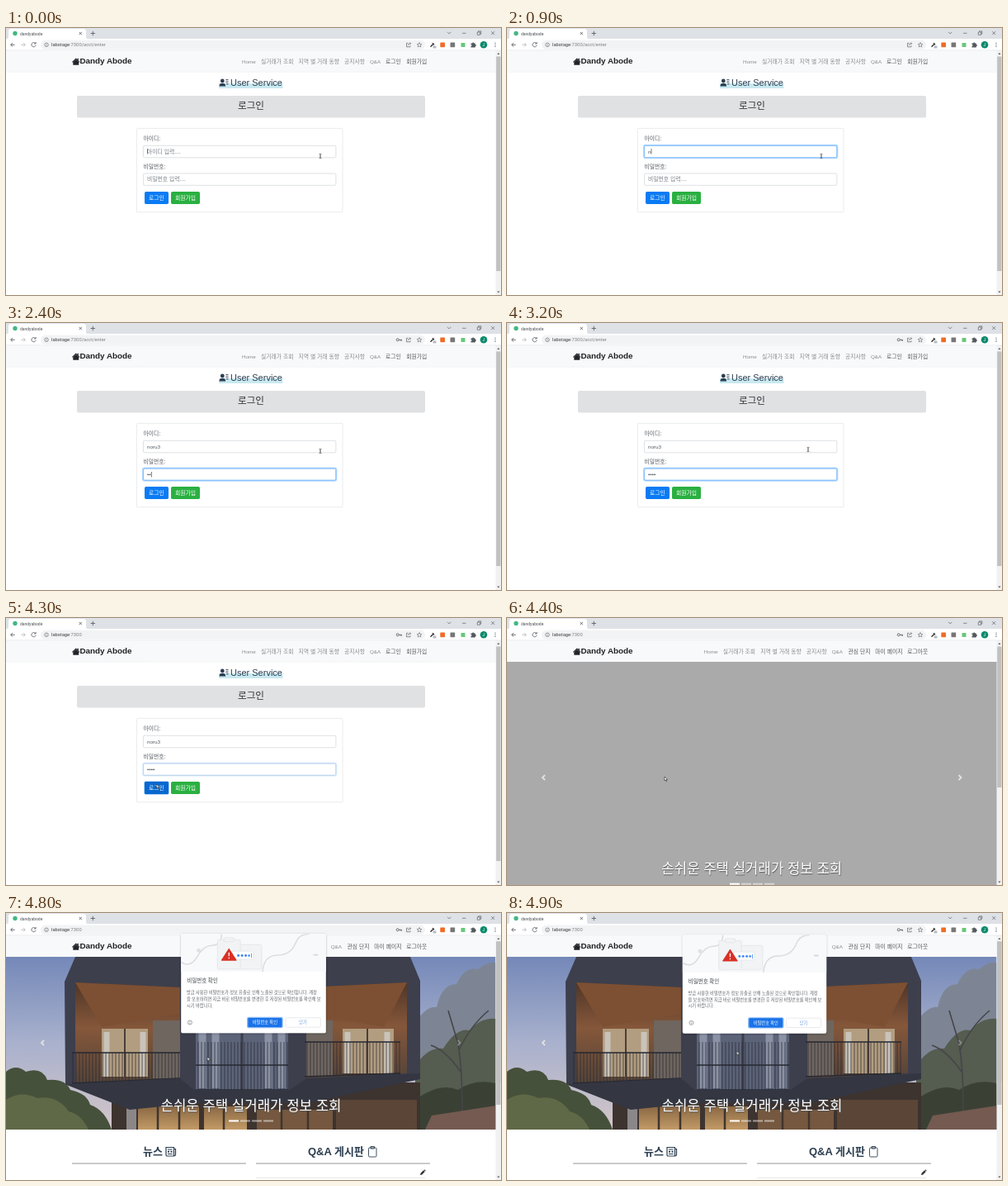
An HTML page for the animation above (5 s loop, 600 by 323 pixels).

```html
<!DOCTYPE html>
<html lang="ko">
<head>
<meta charset="utf-8">
<title>dandyabode</title>
<style>
html, body { margin: 0; width: 100%; height: 100%; overflow: hidden; background: #fff; }
svg { display: block; width: 100vw; height: 100vh; }
text { font-family: "Liberation Sans", "Noto Sans CJK KR", "Noto Sans CJK", sans-serif; font-size: 6.8px; fill: #555b62; }
.ui { font-family: Roboto, "Noto Sans CJK KR", "Noto Sans CJK", sans-serif; }
.url { font-size: 5.8px; fill: #7c8085; }
.url tspan { fill: #3a3d41; }
.lat { font-size: 6.25px; }
.link { fill: #8b8c8e; }
.on { fill: #55585b; font-weight: 500; }
.hint { fill: #777f87; }
.mid { text-anchor: middle; }
.white { fill: #fff; }
.head { font-size: 13px; font-weight: 700; fill: #2c3e50; }
.line { fill: none; stroke: #5f6368; stroke-width: .9; }
.field { fill: #fff; stroke: #ced4da; stroke-width: .7; }
.ring { fill: none; stroke: #b9dcff; stroke-width: 2; }
.edge { fill: none; stroke: #73b5fb; stroke-width: .8; }
.caption { font-size: 16.75px; font-weight: 350; fill: #fff; text-anchor: middle; text-shadow: .5px .5px 1px #555; }
.small { font-size: 5.3px; fill: #5f6368; }

.a { animation: 5s step-end -20ms infinite; }
.login { animation-name: login; }
.home { animation-name: home; }
.wait { animation-name: wait; }
.photo { animation-name: photo; }
.key { animation-name: key; }
.long { animation-name: long; }
.short, .pressed { animation-name: short; }
.hover { animation-name: hover; }
.focus1 { animation-name: focus1; }
.focus2 { animation-name: focus2; }
.hint1 { animation-name: hint1; }
.hint2 { animation-name: hint2; }
.name { animation-name: name; }
.dots { animation-name: dots; }
.caret { animation-name: caret; }
.mouse { animation-name: mouse; }
.beam { animation-name: beam; }
.arrow { animation-name: arrow; }
.dialog { animation-name: dialog; transform-origin: 300px 190px; }

@keyframes login { 0% { opacity: 1 } 88%, to { opacity: 0 } }
@keyframes home { 0% { opacity: 0 } 88%, to { opacity: 1 } }
@keyframes wait { 0% { opacity: 1 } 96%, to { opacity: 0 } }
@keyframes photo { 0% { opacity: 0 } 96%, to { opacity: 1 } }
@keyframes key { 0% { opacity: 0 } 42%, to { opacity: 1 } }
@keyframes long { 0% { opacity: 1 } 86%, to { opacity: 0 } }
@keyframes short { 0% { opacity: 0 } 86%, to { opacity: 1 } }
@keyframes hover { 0% { opacity: 0 } 82%, to { opacity: 1 } }
@keyframes focus1 { 0% { opacity: 0 } 2% { opacity: 1 } 40%, to { opacity: 0 } }
@keyframes focus2 { 0% { opacity: 0 } 40% { opacity: 1 } 86%, to { opacity: .4 } }
@keyframes hint1 { 0% { opacity: 1 } 16%, to { opacity: 0 } }
@keyframes hint2 { 0% { opacity: 1 } 42%, to { opacity: 0 } }
@keyframes name {
  0% { clip-path: inset(0 100% 0 0) } 16% { clip-path: inset(0 78.2% 0 0) }
  20% { clip-path: inset(0 56.5% 0 0) } 24% { clip-path: inset(0 43.5% 0 0) }
  28% { clip-path: inset(0 21.7% 0 0) } 32%, to { clip-path: inset(0) }
}
@keyframes dots {
  0% { clip-path: inset(0 100% 0 0) } 42% { clip-path: inset(0 75% 0 0) }
  46% { clip-path: inset(0 50% 0 0) } 50% { clip-path: inset(0 25% 0 0) }
  54%, to { clip-path: inset(0) }
}
@keyframes caret {
  0% { transform: none; opacity: 1 } 10% { transform: none; opacity: 0 }
  16% { transform: translate(3.5px, 0); opacity: 1 } 20% { transform: translate(7px, 0); opacity: 1 }
  24% { transform: translate(9px, 0); opacity: 1 } 28% { transform: translate(12.5px, 0); opacity: 1 }
  32% { transform: translate(16px, 0); opacity: 1 } 40% { transform: translate(0, 34px); opacity: 1 }
  42% { transform: translate(2.6px, 34px); opacity: 1 } 46% { transform: translate(4.9px, 34px); opacity: 1 }
  50% { transform: translate(7.2px, 34px); opacity: 1 } 54% { transform: translate(9.6px, 34px); opacity: 1 }
  64% { transform: translate(9.6px, 34px); opacity: 0 } 74% { transform: translate(9.6px, 34px); opacity: 1 }
  84%, to { transform: translate(9.6px, 34px); opacity: 0 }
}
@keyframes mouse {
  0% { transform: translate(381px, 155px) }
  60% { transform: translate(381px, 155px); animation-timing-function: steps(2) }
  64% { transform: translate(365px, 153px) }
  66% { transform: translate(365px, 153px); animation-timing-function: steps(9) }
  84% { transform: translate(182.5px, 201px) }
  88% { transform: translate(191px, 192px); animation-timing-function: steps(3) }
  94% { transform: translate(210px, 181px); animation-timing-function: steps(2) }
  98%, to { transform: translate(278.5px, 167px) }
}
@keyframes beam { 0% { opacity: 1 } 70% { opacity: 0 } 74% { opacity: 1 } 80%, to { opacity: 0 } }
@keyframes arrow { 0% { opacity: 0 } 70% { opacity: 1 } 74% { opacity: 0 } 80%, to { opacity: 1 } }
@keyframes dialog {
  0% { opacity: 0; transform: scale(.98) } 92% { opacity: .7; transform: scale(.99) }
  94% { opacity: .96; transform: none } 96% { opacity: 1; transform: scale(.992) }
  98%, to { opacity: 1; transform: scale(.985) }
}
</style>
</head>
<body>
<svg viewBox="0 0 600 323">
  <defs>
    <linearGradient id="sky" x2="0" y2="1">
      <stop stop-color="#7488b8"/><stop offset=".5" stop-color="#a9b1cd"/><stop offset="1" stop-color="#d3c6c8"/>
    </linearGradient>
    <linearGradient id="wood" x2="0" y2="1">
      <stop stop-color="#4f3527"/><stop offset=".45" stop-color="#85573a"/><stop offset="1" stop-color="#554439"/>
    </linearGradient>
    <linearGradient id="glow" x2="0" y2="1">
      <stop stop-color="#8a6844"/><stop offset="1" stop-color="#c29a66"/>
    </linearGradient>
    <pattern id="bars" width="4" height="40" patternUnits="userSpaceOnUse">
      <path d="M1 0V40" stroke="#24252e" stroke-width=".7"/>
    </pattern>
    <clipPath id="frame"><path d="M0 53H593.5V262H0Z"/></clipPath>
    <clipPath id="sheet"><rect x="211.500" y="24" width="177" height="121" rx="2"/></clipPath>
    <filter id="shade" x="-10%" y="-10%" width="120%" height="125%">
      <feDropShadow dx="0" dy=".7" stdDeviation="1" flood-opacity=".35"/>
    </filter>
    <g id="marks">
      <path d="M270 0h12" stroke="#fff" stroke-width="2"/>
      <path d="M284 0h12M298 0h12M312 0h12" stroke="#fff" stroke-opacity=".5" stroke-width="2"/>
    </g>
    <g id="menu">
      <text class="link lat" x="286" y="42.500">Home</text>
      <text class="link" x="309" y="42.500">실거래가 조회</text>
      <text class="link" x="354.500" y="42.500">지역 별 거래 동향</text>
      <text class="link" x="410" y="42.500">공지사항</text>
      <text class="link lat" x="441" y="42.500">Q&amp;A</text>
    </g>
  </defs>
  <rect width="600" height="323" fill="#fff"/>

  <!-- login page -->
  <g class="a login">
    <path d="M0 27H594V53H0Z" fill="#f8f9fa"/>
    <path d="M0 53.300H594" stroke="#eceef0" stroke-width=".6"/>
    <use href="#menu"/>
    <text class="on" x="460" y="42.500">로그인</text>
    <text class="on" x="485.300" y="42.500">회원가입</text>

    <path d="M258 67H335.500V73H258Z" fill="#c9e9f0"/>
    <g fill="#2c3e50">
      <circle cx="262.300" cy="64" r="2.400"/>
      <path d="M258.500 70.500q0-3.600 2.500-3.600h2.600q2.500 0 2.500 3.600Z"/>
      <path d="M266.300 62.300h3.200v.9h-3.200zM266.300 64.800h3.200v.9h-3.200zM267 67.300h2.500v.9h-2.500z"/>
    </g>
    <text x="272" y="70" style="font-size:11px;fill:#2c3e50">User Service</text>

    <rect x="86" y="82" width="422" height="26.500" rx="2" fill="#dfe1e3"/>
    <text class="mid" x="297" y="97.500" style="font-size:11.6px;fill:#303438">로그인</text>

    <rect x="158.400" y="121.400" width="249.600" height="101.400" rx="1" fill="#fff" stroke="#e4e6e8" stroke-width=".8"/>
    <text x="166.500" y="136">아이디:</text>
    <rect class="field" x="166.400" y="142.300" width="233.500" height="14.500" rx="1.600"/>
    <g class="a focus1">
      <rect class="ring" x="165.900" y="141.800" width="234.500" height="15.500" rx="2"/>
      <rect class="edge" x="166.400" y="142.300" width="233.500" height="14.500" rx="1.600"/>
    </g>
    <text class="hint a hint1" x="171" y="151.700">아이디 입력....</text>
    <text class="lat a name" x="171" y="151.500">noru3</text>

    <text x="166.500" y="170">비밀번호:</text>
    <rect class="field" x="166.400" y="176" width="233.500" height="14.300" rx="1.600"/>
    <g class="a focus2">
      <rect class="ring" x="165.900" y="175.500" width="234.500" height="15.300" rx="2"/>
      <rect class="edge" x="166.400" y="176" width="233.500" height="14.300" rx="1.600"/>
    </g>
    <text class="hint a hint2" x="171" y="185.400">비밀번호 입력....</text>
    <g class="a dots" fill="#444a50">
      <circle cx="172.200" cy="183.300" r=".85"/><circle cx="174.500" cy="183.300" r=".85"/>
      <circle cx="176.800" cy="183.300" r=".85"/><circle cx="179.100" cy="183.300" r=".85"/>
    </g>
    <rect class="a caret" x="171" y="146" width=".6" height="6.500" fill="#222"/>

    <rect class="a pressed" x="167.200" y="197.200" width="30.600" height="16.600" rx="2.500" fill="#9ccbfa"/>
    <rect x="168" y="198" width="29" height="15" rx="1.800" fill="#0a7bf4"/>
    <rect class="a hover" x="168" y="198" width="29" height="15" rx="1.800" fill="#0768cf"/>
    <text class="mid white" x="182.500" y="207.800">로그인</text>
    <rect x="200" y="198" width="35" height="15" rx="1.800" fill="#2ab041"/>
    <text class="mid white" x="217.500" y="207.800">회원가입</text>
  </g>

  <!-- home page -->
  <g class="a home">
    <path d="M0 27H594V53H0Z" fill="#f8f9fa"/>
    <use href="#menu" x="-47.300"/>
    <text class="on" x="413.500" y="42.500">관심 단지</text>
    <text class="on" x="446.300" y="42.500">마이 페이지</text>
    <text class="on" x="485.300" y="42.500">로그아웃</text>

    <g class="a wait">
      <path d="M0 53H594V323H0Z" fill="#aaa"/>
      <path d="M46 190l-3 3 3 3M547.500 190l3 3-3 3" fill="none" stroke="#e2e2e2" stroke-width="1.800"/>
      <text class="caption" x="296.800" y="309">손쉬운 주택 실거래가 정보 조회</text>
      <use href="#marks" y="321.700"/>
    </g>

    <g class="a photo">
      <path d="M0 53H594V323H0Z" fill="#fff"/>
      <g clip-path="url(#frame)">
        <path d="M0 53H594V262H0Z" fill="url(#sky)"/>

        <!-- trees and neighbouring roof -->
        <path d="M496 132q14-20 26-18 6-28 24-28 10-22 26-18 12-10 22-8v202H496Z" fill="#7d8594"/>
        <path d="M496 186q14-24 34-22 16-26 32-22 14-16 32-14v134H496Z" fill="#555c50"/>
        <path d="M496 226q30-22 52-12 20-14 46-8v56H496Z" fill="#3b4035"/>
        <path d="M552 262q3-60-4-104l-12-40M549 166q14-30 36-48M551 192q-18-26-36-32" fill="none" stroke="#454548" stroke-width="1.600"/>
        <path d="M508 262l8-17 78-12v29Z" fill="#745a50"/>

        <!-- ground floor -->
        <path d="M128 205H502V262H128Z" fill="#3d332f"/>
        <path d="M160 234h74v28h-74zM240 234h52v28h-52z" fill="url(#glow)"/>
        <path d="M304 238h92v24h-92z" fill="#75583f"/>
        <path d="M400 226h98v36h-98z" fill="#5b4536"/>
        <path d="M184 234v28M210 234v28M264 234v28M334 238v24M366 238v24" stroke="#40352f" stroke-width="2.500"/>
        <path d="M146 232h12v30h-12z" fill="#8b8789"/>

        <!-- upper floor -->
        <path d="M71 83L84 53H490L502 82V200L366 214 350 222H228L150 232 72 207Z" fill="#3d3f4d"/>
        <path d="M84 84L211 90V200L84 206Z" fill="url(#wood)"/>
        <path d="M364 90L486 84V194L364 200Z" fill="url(#wood)"/>
        <path d="M84 84L211 90V122L116 138Z" fill="#7d5033"/>
        <path d="M486 84L364 90V122L458 138Z" fill="#7d5033"/>
        <path d="M116 140H172V198H116zM408 140H470V194H408z" fill="#b29d80"/>
        <path d="M122 144v54M166 144v54M414 144v50M462 144v50" stroke="#c9c3ba" stroke-width="7"/>
        <path d="M144 140v58M438 140v54" stroke="#4a3e38" stroke-width="2"/>
        <path d="M178 130H211V200H178zM364 130H396V197H364z" fill="#6e665f"/>
        <path d="M230 90H342V214H230Z" fill="#5c6479"/>
        <path d="M238 90v122M254 90v122M318 90v122M334 90v122" stroke="#8b92a5" stroke-width="9"/>
        <path d="M286 90V214" stroke="#3d3f4d" stroke-width="3"/>
        <path d="M80 169H211V206H80zM230 156H342V214H230zM362 156H478V197H362z" fill="url(#bars)"/>
        <path d="M80 169H211M230 184H342M362 156H478M80 206L211 200M230 214H342M362 198L478 194" stroke="#262832" stroke-width="1.300"/>
        <path d="M71 207L211 200 228 214H344L364 200 502 194V201L366 230H228L150 238Z" fill="#343642"/>

        <!-- shrubs -->
        <path d="M0 192q12-10 24 0 20-6 26 10 22-2 28 12 20 4 24 18 18 6 26 30H0Z" fill="#46513b"/>
        <path d="M0 226q18-12 38-2 24-4 38 16 16 4 24 22H0Z" fill="#5f6947"/>
      </g>
      <path d="M46 154l-3 3 3 3" fill="none" stroke="#e2e2e2" stroke-width="1.800"/>
      <path d="M547.500 154l3 3-3 3" fill="none" stroke="#e2e2e2" stroke-opacity=".35" stroke-width="1.800"/>
      <text class="caption" x="297" y="239">손쉬운 주택 실거래가 정보 조회</text>
      <use href="#marks" y="251.500"/>

      <text class="head" x="166" y="293">뉴스</text>
      <g fill="none" stroke="#2c3e50" stroke-width="1.200">
        <path d="M194 283.500h9.500v10.500h-8.200q-1.300 0-1.300-1.300zM203.500 285.500h2v7q0 1.500-2 1.500M196 286h5.500M196 291.500h5.500"/>
        <path d="M196 288.700h2M199.500 288.700h2" stroke-width="2"/>
        <rect x="439.500" y="284" width="9.500" height="11" rx="1.200" stroke-width=".9"/>
        <path d="M442 284v-1.500h4.500v2.500h-4.500z" stroke-width=".9"/>
      </g>
      <text class="head" x="366" y="293">Q&amp;A 게시판</text>
      <path d="M80 303H291M303 303H514" stroke="#8b8b8b" stroke-width=".9"/>
      <path d="M303 320.500H508" stroke="#ddd" stroke-width=".7"/>
      <path d="M502 317l.6-2.300 3.400-3.400 1.700 1.700-3.400 3.400zM506.400 310.900l.8-.7 1.600 1.600-.7.800z" fill="#333"/>
    </g>
  </g>

  <!-- brand -->
  <g fill="#212529">
    <path d="M80 41l4.700-4.600 1.800 1.700v-1.300h1.300v2.600l1.700 1.600-.8.800-4-3.900-4 3.900z"/>
    <path d="M81.300 41.300l3.400-3.300 3.500 3.300v3.500h-6.900z"/>
  </g>
  <text x="89.500" y="43.400" style="font-size:9.86px;font-weight:700;fill:#1f2225">Dandy Abode</text>

  <!-- scrollbar -->
  <path d="M593.500 27H600V323H593.500Z" fill="#f1f1f1"/>
  <path class="a login" d="M594.200 34.500h5.300V294h-5.300z" fill="#c1c1c1"/>
  <g class="a home" fill="#c1c1c1">
    <path d="M594.200 34.500h5.300V205h-5.300z"/>
    <path class="a photo" d="M594.200 34.500h5.300V232h-5.300z"/>
  </g>
  <path d="M595.300 32l1.600-2 1.600 2zM595.300 318.500l1.600 2 1.600-2z" fill="#606060"/>

  <!-- browser bars -->
  <path d="M0 0H600V13.500H0Z" fill="#dee1e6"/>
  <path d="M0 13.500q3 0 3-3V4q0-3 3-3h88q3 0 3 3v6.500q0 3 3 3Z" fill="#fff"/>
  <path d="M0 13.300H600V27H0Z" fill="#fff"/>
  <path d="M0 26.800H600" stroke="#e2e4e7" stroke-width=".6"/>
  <circle cx="11" cy="6.500" r="2.700" fill="#41b883"/>
  <text class="ui" x="17" y="8.500" style="font-size:5px;fill:#4a4e52">dandyabode</text>
  <path class="line" d="M88.700 4.900l3.200 3.200m0-3.200l-3.200 3.200M102.600 6.500h5.400M105.300 3.800v5.400"/>
  <path class="line" style="stroke-width:.7" d="M535 4.800l2.200 2.200 2.200-2.200M553 6.300h4.500M571.300 5h3.300v3.300h-3.300zM572.500 5v-1.200h3.300v3.300h-1.200M588.200 4.100l4 4m0-4l-4 4"/>
  <path class="line" d="M10.700 20.300H5.700m2.300-2.300l-2.300 2.300 2.300 2.300"/>
  <path class="line" style="stroke:#bbbdc0" d="M18.300 20.300h5m-2.300-2.300l2.300 2.300-2.300 2.300"/>
  <path class="line" d="M35.600 18.600a2.600 2.600 0 1 0 .5 2.200M36.100 17v2h-2"/>
  <rect x="42" y="14.800" width="466" height="11" rx="5.500" fill="#f1f3f4"/>
  <circle class="line" cx="49" cy="20.300" r="2.300" style="stroke-width:.6"/>
  <path class="line" style="stroke-width:.6" d="M49 20v1.500M49 18.700v.6"/>
  <text class="ui url a long" x="55" y="22.400"><tspan>labstage</tspan>:7300/acct/enter</text>
  <text class="ui url a short" x="55" y="22.400"><tspan>labstage</tspan>:7300</text>
  <g class="a key"><circle class="line" cx="474.700" cy="20.300" r="1.500"/><path class="line" d="M476.200 20.300h3.300v1.500M478 20.300v1.300"/></g>
  <path class="line" style="stroke-width:.7" d="M487.500 18.300h-2v4.500h4.500v-1.500M487.300 21q.2-2.300 3.200-2.300m-1.200-1.300l1.300 1.300-1.300 1.300"/>
  <path class="line" style="stroke-width:.6" d="M501 17.500l.8 1.900 2 .2-1.500 1.300.5 2-1.800-1.100-1.800 1.100.5-2-1.500-1.300 2-.2z"/>
  <path d="M514.500 22.800l3-3M517 18.300l2 2" stroke="#333" stroke-width="1.400"/>
  <rect x="517.500" y="21.500" width="4" height="3" rx=".6" fill="#b8bbc0"/>
  <rect x="526.300" y="17.500" width="5.700" height="5.700" rx=".6" fill="#ef6c27"/>
  <rect x="538.500" y="17.500" width="5.700" height="5.700" rx=".6" fill="#777"/>
  <rect x="551.500" y="18" width="5" height="5" rx=".6" fill="#69c779"/>
  <path d="M563.500 18.500h1.600a1.100 1.100 0 0 1 2.200 0h1.500v1.500a1.100 1.100 0 0 1 0 2.200v1.300h-5.300v-1.500a1 1 0 0 0 0-2z" fill="#55595e"/>
  <circle cx="579" cy="20.300" r="4.300" fill="#0b8a6b"/>
  <text class="ui mid white" x="579" y="22.100" style="font-size:5px">J</text>
  <g fill="#5f6368"><circle cx="593" cy="18.200" r=".65"/><circle cx="593" cy="20.300" r=".65"/><circle cx="593" cy="22.400" r=".65"/></g>

  <!-- password notice -->
  <g class="a dialog">
    <rect x="211.500" y="24" width="177" height="121" rx="2" fill="#fff" filter="url(#shade)"/>
    <g clip-path="url(#sheet)">
      <path d="M211 24H389V70H211Z" fill="#f8f9fa"/>
      <path d="M211 58q12 8 20-6t18-14q12 0 12-14M311 70q2-20 18-20 16 0 22-14 4-12 17-12" fill="none" stroke="#d9dce0" stroke-width="1.500"/>
      <circle cx="233" cy="44" r="2.500" fill="#dfe1e5"/>
      <path d="M374 49.500h4" stroke="#d5d8dc" stroke-width="2" stroke-linecap="round"/>
    </g>
    <g fill="#f1f3f4" stroke="#dfe2e6" stroke-width=".7">
      <rect x="283" y="37" width="27" height="30" rx="1.500"/>
      <rect x="256" y="31" width="28" height="36" rx="1.500"/>
      <rect x="264" y="28.500" width="12" height="5" rx="1"/>
      <rect x="274" y="45" width="26" height="10" rx="2" fill="#fff"/>
    </g>
    <path d="M270 42.300l8.800 13.700h-17.600z" fill="#d93025" stroke="#d93025" stroke-width="1.200" stroke-linejoin="round"/>
    <path d="M270 46.700v4.500M270 52.700v1.500" stroke="#fff" stroke-width="1.300"/>
    <g fill="#4285f4">
      <circle cx="281.500" cy="50.300" r="1.500"/><circle cx="286" cy="50.300" r="1.500"/><circle cx="290.500" cy="50.300" r="1.500"/><circle cx="294.500" cy="50.300" r="1.300"/>
      <path d="M297 47.500h.8v5.600h-.8z"/>
    </g>
    <text class="ui" x="218.500" y="83.600" style="fill:#3c4043;font-size:6.600px">비밀번호 확인</text>
    <text class="ui small" x="218.300" y="97.700">방금 사용한 비밀번호가 정보 유출로 인해 노출된 것으로 확인됩니다. 계정</text>
    <text class="ui small" x="218.300" y="105.500">을 보호하려면 지금 바로 비밀번호를 변경한 후 저장된 비밀번호를 확인해 보</text>
    <text class="ui small" x="218.300" y="113.300">시기 바랍니다.</text>
    <circle class="line" cx="222.300" cy="132" r="2.500" style="stroke-width:.6"/>
    <path class="line" style="stroke-width:.6" d="M222.300 131.700v1.700M222.300 130.300v.6"/>
    <rect x="292" y="125.200" width="44" height="13.600" rx="2" fill="#8ab8f5"/>
    <rect x="293.300" y="126.400" width="41.400" height="11.200" rx="1.300" fill="#1a73e8"/>
    <text class="ui small mid white" x="314" y="133.900" style="fill:#fff;font-weight:500">비밀번호 확인</text>
    <rect x="339.300" y="126.200" width="42.700" height="11.600" rx="1.400" fill="#fff" stroke="#dadce0" stroke-width=".6"/>
    <text class="ui small mid" x="360.500" y="133.900" style="fill:#6a9de0">닫기</text>
  </g>

  <g class="a mouse">
    <path class="a beam" d="M-1.500-2.600h1q.5 0 .5.500v4.200q0 .5-.5.500h-1M1.500-2.600h-1q-.5 0-.5.500v4.200q0 .5.500.5h1" fill="none" stroke="#444" stroke-width=".6"/>
    <path class="a arrow" d="M0 0v4.800l1.100-1 .8 1.800.9-.4-.8-1.700h1.500z" fill="#fff" stroke="#222" stroke-width=".6"/>
  </g>
</svg>
</body>
</html>
```
